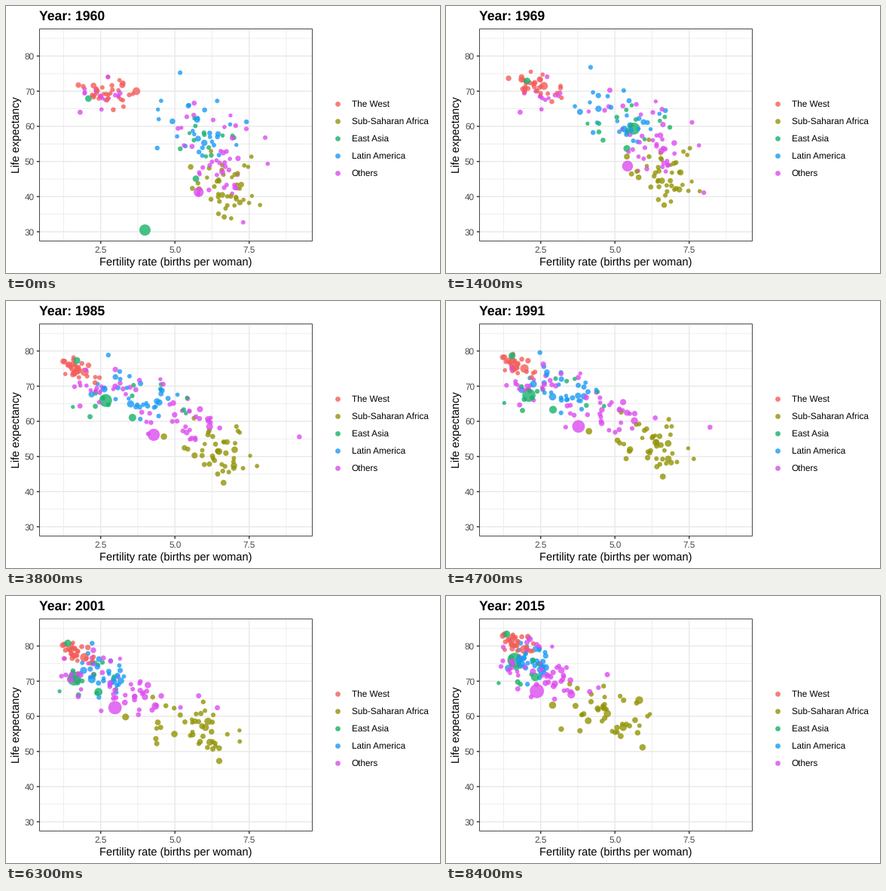
A matplotlib script for the animation above (10000 ms loop, 576x355 px).

```python
import numpy as np
import matplotlib.pyplot as plt
from matplotlib.animation import FuncAnimation
from matplotlib.patches import Rectangle

WIDTH, HEIGHT, DPI = 576, 355, 100
PT = 72 / DPI  # points per pixel
FRAMES, LAST_MOVE = 100, 84
FIRST_YEAR, LAST_YEAR = 1960, 2015
LEFT, RIGHT, TOP, BOTTOM = 44.5, 406.5, 30.5, 312.5

COLORS = {
    "The West": "#f35e5a",
    "Sub-Saharan Africa": "#929405",
    "East Asia": "#18b26a",
    "Latin America": "#1a9af5",
    "Others": "#dd4bf0",
}
WEST, AFRICA, ASIA, LATIN, OTHERS = COLORS

plt.rcParams.update({"font.family": "Liberation Sans", "text.hinting": "none"})
rng = np.random.default_rng(5)


def px(fertility):
    return 27.2 + 39.4 * np.asarray(fertility)


def py(expectancy):
    return 300.2 - 4.674 * (np.asarray(expectancy) - 30)


# ---- countries: each has a rule that gives fertility and life expectancy ----
countries = []


def add(region, people, rule):
    countries.append((COLORS[region], people, rule))


def transition(high, low, middle, tau, life, bend):
    """Fertility falls along a logistic curve while life expectancy rises."""
    def rule(year):
        done = (year - FIRST_YEAR) / (LAST_YEAR - FIRST_YEAR)
        fertility = low + (high - low) / (1 + np.exp((year - middle) / tau))
        return fertility, life[0] + (life[1] - life[0]) * done ** bend
    return rule


def path(*points):
    years, fertility, expectancy = zip(*points)
    return lambda year: (np.interp(year, years, fertility),
                         np.interp(year, years, expectancy))


def normals(count):
    z = rng.standard_normal(count)
    return np.clip((z - z.mean()) / z.std(), -2.1, 2.1)


def region(name, count, high, low, middle, tau, start, end, bend, growth):
    """Small countries, with (mean, spread) pairs; early movers live longer."""
    delay, level, luck = normals(count), normals(count), normals(count)
    health = 0.8 * luck - 0.6 * delay
    late_health = 0.8 * health + 0.6 * normals(count)
    people = np.clip(rng.lognormal(1.7, 1.2, count), 0.2, 60)
    floor = low[0] + low[1] * (0.6 * delay + 0.8 * normals(count))
    for i in range(count):
        life = (start[0] + start[1] * health[i], end[0] + end[1] * late_health[i])
        add(name, (people[i], people[i] * growth),
            transition(high[0] + high[1] * level[i], floor[i],
                       middle[0] + middle[1] * delay[i], tau, life, bend))


region(WEST, 32, high=(2.85, 0.5), low=(1.64, 0.24), middle=(1971, 4), tau=4,
       start=(69.6, 2.2), end=(81, 1.6), bend=1, growth=1.3)
region(AFRICA, 42, high=(6.75, 0.55), low=(4.0, 0.6), middle=(2006, 8), tau=8,
       start=(42.5, 5), end=(60.5, 4.3), bend=0.9, growth=3.6)
region(ASIA, 13, high=(6.3, 0.5), low=(1.85, 0.45), middle=(1981, 8), tau=6,
       start=(56.5, 7), end=(74.5, 4.8), bend=0.8, growth=2.2)
region(LATIN, 30, high=(6.4, 0.9), low=(2.1, 0.33), middle=(1980, 7), tau=10,
       start=(59.5, 5.8), end=(75.5, 2.9), bend=0.85, growth=2.4)
region(OTHERS, 16, high=(2.5, 0.4), low=(1.5, 0.17), middle=(1990, 3), tau=4,
       start=(68.7, 2), end=(74.2, 2.5), bend=3, growth=1.1)
region(OTHERS, 40, high=(6.7, 0.75), low=(2.65, 0.5), middle=(1988, 9), tau=8,
       start=(51.5, 6.8), end=(72.5, 4.2), bend=0.8, growth=2.8)
rng.shuffle(countries)

# Large countries (population in millions) and two unusual paths.
add(LATIN, (72, 204), transition(6.6, 1.7, 1979.5, 10, (55.3, 75), 0.9))
add(ASIA, (667, 1371), path(
    (1960, 3.99, 30.5), (1961, 3.3, 31.5), (1963, 6.1, 50), (1969, 5.7, 59.3),
    (1977, 2.87, 61.9), (1985, 2.66, 66), (1996, 1.6, 68.7), (2015, 1.62, 76)))
add(OTHERS, (450, 1311), transition(6.2, 2, 1987, 12, (41.3, 67.2), 0.7))
add(ASIA, (88, 258), transition(5.8, 2.3, 1981.5, 6, (45.1, 71.2), 0.62))
add(ASIA, (93, 127), transition(2.1, 1.35, 1984, 6, (67.9, 83.4), 0.63))
add(AFRICA, (45, 182), transition(6.6, 5.7, 2000, 8, (40.5, 64.6), 1))
add(OTHERS, (45, 189), transition(6.6, 3.4, 1996, 6, (47, 66.2), 0.65))
add(WEST, (180, 322), transition(3.9, 1.95, 1967, 3.2, (70, 79), 1))
add(OTHERS, (5, 27), path((1960, 7.3, 32.7), (1985, 9.2, 55.7),
                          (1996, 7.3, 60.7), (2015, 4.15, 67)))

# Spread the large dots through the drawing order, so small ones overlap them.
countries = countries[::2] + countries[1::2]

# ---- static chart ----
fig = plt.figure(figsize=(WIDTH / DPI, HEIGHT / DPI), dpi=DPI, facecolor="white")
ax = fig.add_axes([0, 0, 1, 1])
ax.set(xlim=(0, WIDTH), ylim=(HEIGHT, 0))
ax.axis("off")


def line(xs, ys, color, width, z):
    ax.plot(xs, ys, color=color, lw=width * PT, zorder=z, snap=False,
            solid_capstyle="butt")


def label(x, y, text, size, color="black", va="baseline", **kw):
    return ax.text(x, y, text, fontsize=size * PT, color=color, va=va, **kw)


def area(radius):
    return (2 * radius * PT) ** 2


GRID, TICK, TICK_TEXT = "#e8e8e8", "#333333", "#4d4d4d"
SMALL, MEDIUM, LARGE = 11.73, 14.67, 17.6

for v in np.arange(1.25, 9, 2.5):
    line([px(v)] * 2, [TOP, BOTTOM], GRID, 0.75, 1)
for v in range(35, 90, 10):
    line([LEFT, RIGHT], [py(v)] * 2, GRID, 0.75, 1)
for v in (2.5, 5.0, 7.5):
    line([px(v)] * 2, [TOP, BOTTOM], GRID, 1.42, 1)
    line([px(v)] * 2, [BOTTOM, BOTTOM + 3.7], TICK, 1.42, 2)
    label(px(v), 328.2, f"{v:.1f}", SMALL, TICK_TEXT, ha="center")
for v in range(30, 90, 10):
    line([LEFT, RIGHT], [py(v)] * 2, GRID, 1.42, 1)
    line([LEFT - 3.7, LEFT], [py(v)] * 2, TICK, 1.42, 2)
    label(38, py(v) + 4.2, str(v), SMALL, TICK_TEXT, ha="right")

ax.add_patch(Rectangle((LEFT, TOP), RIGHT - LEFT, BOTTOM - TOP, fill=False,
                       ec="#4a4a4a", lw=PT, zorder=4, snap=False))
label(225.5, 345, "Fertility rate (births per woman)", MEDIUM, ha="center")
label(13.7, 171, "Life expectancy", MEDIUM, ha="center", va="center", rotation=90)
title = label(43.8, 19.3, "", LARGE, weight="bold")

for row, (name, color) in enumerate(COLORS.items()):
    y = 129.5 + 23.04 * row
    ax.scatter(440, y, s=area(3.4), color=color, alpha=0.8, lw=0)
    label(458.8, y + 4.3, name, SMALL)

colors, populations, rules = zip(*countries)
dots = ax.scatter(np.zeros(len(rules)), np.zeros(len(rules)), c=colors,
                  lw=0, alpha=0.8, zorder=3)
first, last = np.transpose(populations)


def draw(frame):
    done = min(frame / LAST_MOVE, 1)
    year = FIRST_YEAR + (LAST_YEAR - FIRST_YEAR) * done
    fertility, expectancy = np.transpose([rule(year) for rule in rules])
    people = first + (last - first) * done
    dots.set_offsets(np.column_stack([px(fertility), py(expectancy)]))
    dots.set_sizes(area(2.55 + 7.1 * np.sqrt(people / 1371)))
    title.set_text(f"Year: {round(year)}")
    return dots, title


animation = FuncAnimation(fig, draw, frames=FRAMES, interval=100, repeat=True)
plt.show()
```
